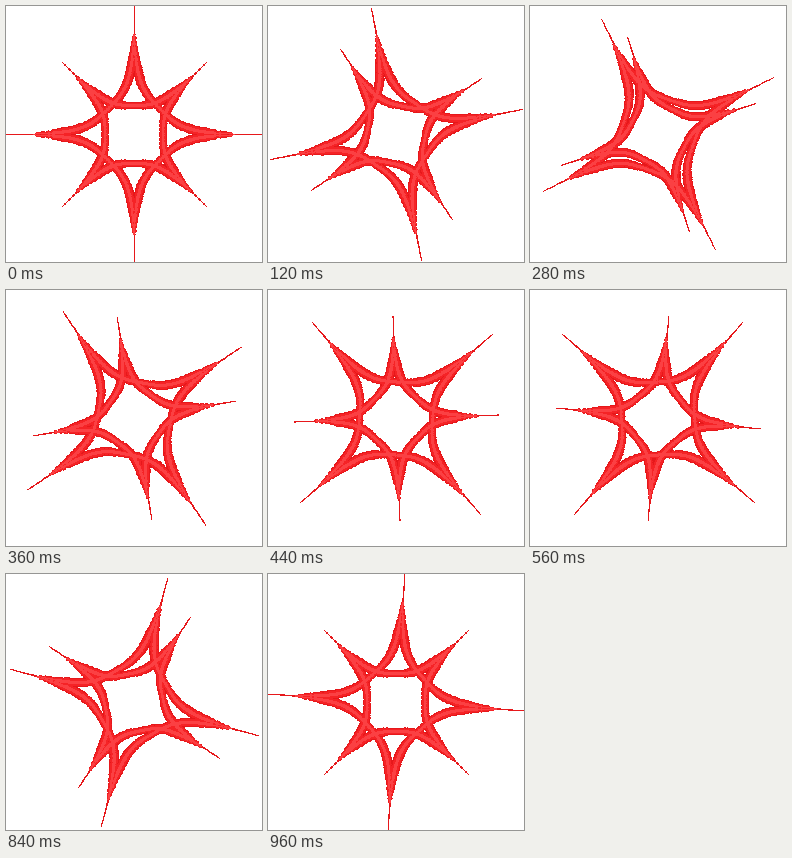
An HTML page with a canvas that plays this animation: 256 px wide and 256 px high, repeating every 1000 ms.

```html
<!DOCTYPE html>
<html>
<head>
<meta charset="utf-8">
<style>
html, body { margin: 0; height: 100%; overflow: hidden; background: #fff; }
canvas { display: block; width: 256px; height: 256px; }
</style>
</head>
<body>
<canvas id="stage" width="256" height="256"></canvas>
<script>
const ctx = document.getElementById('stage').getContext('2d');
const DEG = Math.PI / 180;
const SHADES = [[1, '#e6181b'], [0.75, '#f52326'], [0.35, '#fb4043']];
const clamp = v => Math.min(1, Math.max(0, v));

// Half an edge of a concave four-pointed star, from its middle to the tip
// on the x axis, as beads: x, y, radius
function makeEdge(R) {
  const beads = [], n = 160, mid = 0.285;
  for (let i = 0; i <= n; i++) {
    const h = i / n * Math.SQRT1_2;
    const gap = mid * Math.exp(-h / mid - 7 * h * h);
    const x = (2 * h + gap) / Math.SQRT2, y = gap / Math.SQRT2;
    const grow = clamp((0.79 - x) / 0.25);
    const bump = 0.5 * Math.sin(h * R * 1.6);
    const r = grow ? 0.8 + 3.6 * grow - 1.2 * clamp(1 - h / 0.25) + bump : 0;
    beads.push([x * R, y * R, r]);
  }
  return beads;
}

const big = makeEdge(128), small = makeEdge(102);

// Hard-edged disc, built from pixel rows
function disc(x, y, r) {
  for (let dy = -Math.floor(r); dy <= r; dy++) {
    const w = Math.sqrt(r * r - dy * dy);
    ctx.fillRect(Math.round(x - w), Math.round(y + dy), Math.max(1, Math.round(2 * w)), 1);
  }
}

function drawStar(edge, angle, scale) {
  for (let q = 0; q < 4; q++) {
    const a = (angle + q * 90) * DEG, c = Math.cos(a), s = Math.sin(a);
    for (const [x, y, r] of edge) {
      if (!r && scale < 1) continue;
      for (const v of [y, -y]) disc(128 + x * c - v * s, 128 + x * s + v * c, r * scale);
    }
  }
}

function draw(step) {
  ctx.fillStyle = '#fff';
  ctx.fillRect(0, 0, 256, 256);
  for (const [scale, color] of SHADES) {
    ctx.fillStyle = color;
    drawStar(big, -step * 90 / 24, scale);
    drawStar(small, 45 + step * 90 / 23, scale);
  }
}

let shown = -1;
function tick() {
  let step = Math.floor(performance.now() % 1000 / 40);
  if (step > 11) step--; // the halfway pose is held twice as long
  if (step !== shown) draw(shown = step);
  requestAnimationFrame(tick);
}
tick();
</script>
</body>
</html>
```
